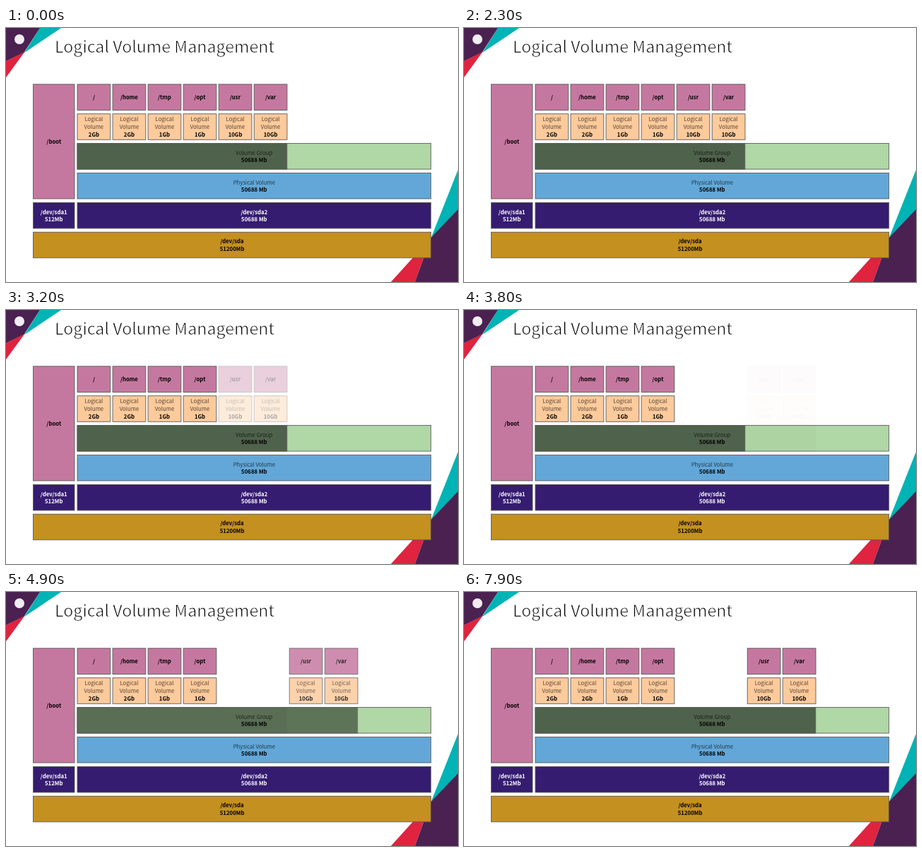
Recreate the animation shown at these times as an HTML page. Size 640x360 px, loop 8 s.

```html
<!DOCTYPE html>
<html lang="en">
<head>
<meta charset="utf-8">
<title>Logical Volume Management</title>
<style>
  html, body { margin: 0; width: 100%; height: 100%; overflow: hidden; background: #fff; }
  svg { display: block; width: 100vw; height: 100vh; }
  text { font-family: "Noto Sans CJK JP", "Noto Sans CJK SC", "Noto Sans", sans-serif; font-size: 7.8px; font-weight: 300; }
  /* A white outline thins the strokes to a light weight. */
  .title { font-size: 23.2px; stroke: #fff; stroke-width: .75px; }
  .light { fill-opacity: .66; }
  .bold { font-weight: 700; }
  .mid { text-anchor: middle; }
</style>
</head>
<body>
<svg id="stage" viewBox="0 0 640 360"></svg>
<script>
const LOOP = 8000;
const FADE = 1350;
const OUT_AT = 2320;
const IN_AT = 3770;
const PINK = '#c5789f', PEACH = '#fdca9b', LIME = '#b0d7a6', MOSS = '#4f624b';
const BLUE = '#62a7d8', INDIGO = '#351c70', GOLD = '#c49020';
const PLUM = '#4a2150', TEAL = '#00b3b5', RED = '#e0233f';
const LEFT = 38.5, INNER = 101, RIGHT = 601.7;

const stage = document.getElementById('stage');

function add(parent, tag, attrs, content) {
  const el = document.createElementNS('http://www.w3.org/2000/svg', tag);
  for (const key in attrs) el.setAttribute(key, attrs[key]);
  if (content) el.textContent = content;
  parent.appendChild(el);
  return el;
}

const poly = (points, fill) => add(stage, 'polygon', { points, fill });

function box(parent, x, y, right, bottom, fill) {
  return add(parent, 'rect', {
    x, y, width: right - x, height: bottom - y, fill, stroke: '#595959', 'stroke-width': .89
  });
}

function label(parent, x, y, str, weight = 'bold', fill = '#000') {
  add(parent, 'text', { x, y, fill, class: 'mid ' + weight }, str);
}

function bar(x, y, right, fill, top, size, weight, color) {
  box(stage, x, y, right, y + 36.5, fill);
  const cx = (x + right) / 2;
  label(stage, cx, y + 16, top, weight, color);
  label(stage, cx, y + 26.8, size, 'bold', color);
}

function volume(parent, slot, path, size) {
  const x = INNER + slot * 50.04, cx = x + 23.4;
  box(parent, x, 79.8, x + 46.8, 116.5, PINK);
  label(parent, cx, 101, path);
  box(parent, x, 121.7, x + 46.8, 158.3, PEACH);
  label(parent, cx, 132.2, 'Logical', 'light');
  label(parent, cx, 142.8, 'Volume', 'light');
  label(parent, cx, 153.6, size);
}

function largePair(slot) {
  const g = add(stage, 'g', {});
  volume(g, slot, '/usr', '10Gb');
  volume(g, slot + 1, '/var', '10Gb');
  return g;
}

// Slide corners
poly('48,0 78,0 26,35', TEAL);
poly('0,47 27,33 0,70', RED);
poly('0,0 48,0 26,34 0,47', PLUM);
poly('640,201 602,297 640,264', TEAL);
poly('602,297 545,360 579,360', RED);
poly('640,257 602,297 579,360 640,360', PLUM);
add(stage, 'circle', { cx: 19, cy: 16, r: 7, fill: '#f1edf3' });
add(stage, 'text', { x: 69, y: 34.5, class: 'title' }, 'Logical Volume Management');

// Disk, partitions and physical volume
box(stage, LEFT, 79.8, 97, 242, PINK);
label(stage, 67.8, 164, '/boot');
bar(INNER, 205.5, RIGHT, BLUE, 'Physical Volume', '50688 Mb', 'light');
bar(LEFT, 247.5, 97, INDIGO, '/dev/sda1', '512Mb', 'bold', '#fff');
bar(INNER, 247.5, RIGHT, INDIGO, '/dev/sda2', '50688 Mb', 'bold', '#fff');
bar(LEFT, 289.3, RIGHT, GOLD, '/dev/sda', '51200Mb', 'bold');

// Volume group with its used part
box(stage, INNER, 163.6, RIGHT, 200.1, LIME);
const usedBefore = box(stage, INNER, 163.6, 397.8, 200.1, MOSS);
const usedAfter = box(stage, INNER, 163.6, 497.8, 200.1, MOSS);
label(stage, 351.3, 179.6, 'Volume Group', 'light');
label(stage, 351.3, 190.4, '50688 Mb');

[['/', '2Gb'], ['/home', '2Gb'], ['/tmp', '1Gb'], ['/opt', '1Gb']]
  .forEach(([path, size], i) => volume(stage, i, path, size));
const before = largePair(4);
const after = largePair(6);

const progress = (t, start) => Math.min(1, Math.max(0, (t - start) / FADE));

function draw(t) {
  const gone = progress(t, OUT_AT), shown = progress(t, IN_AT);
  before.setAttribute('opacity', 1 - gone);
  after.setAttribute('opacity', shown);
  usedBefore.setAttribute('opacity', 1 - shown * shown);
  usedAfter.setAttribute('opacity', shown);
}

const origin = performance.now();
function tick() {
  draw((performance.now() - origin) % LOOP);
  requestAnimationFrame(tick);
}
draw(0);
requestAnimationFrame(tick);
</script>
</body>
</html>
```
